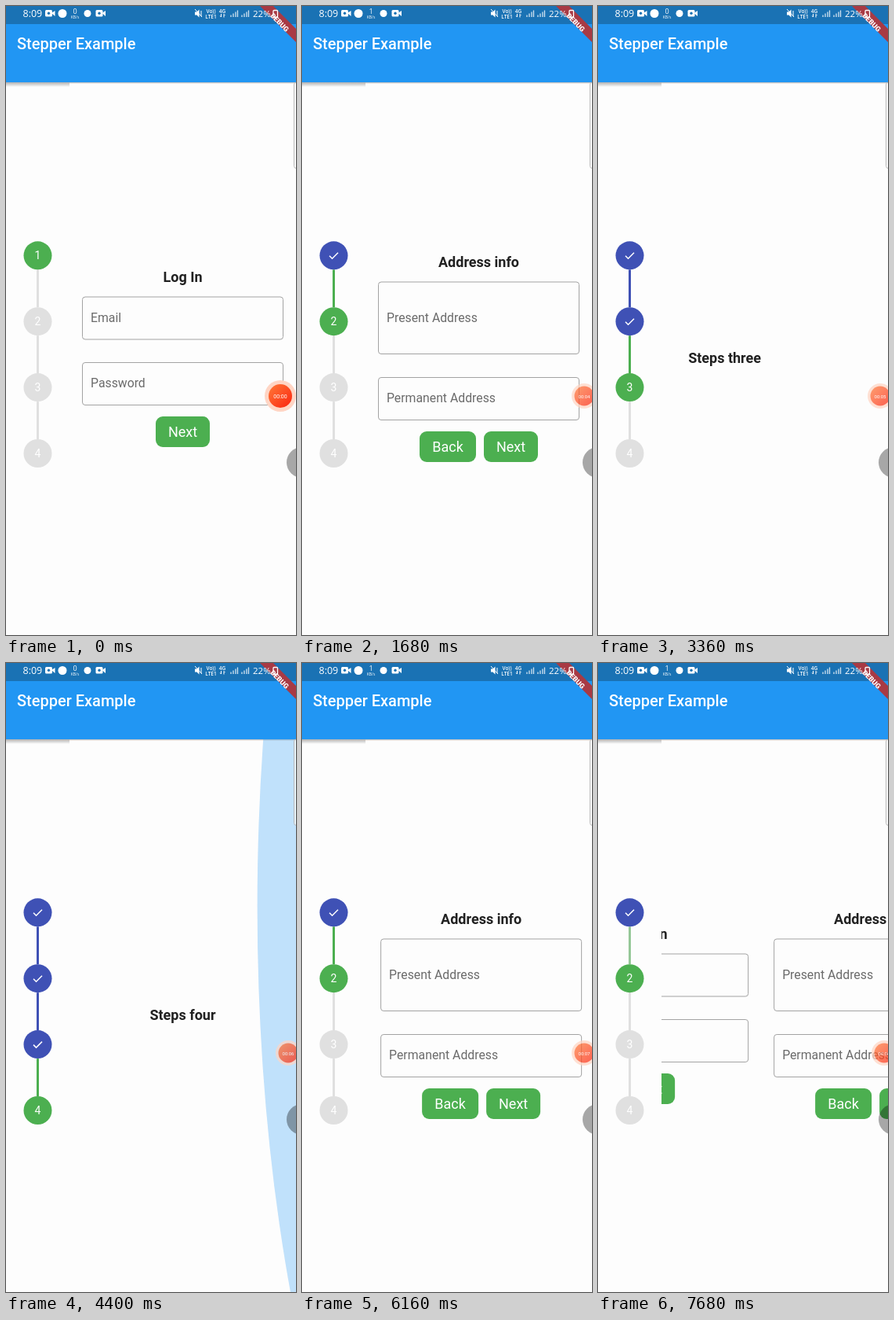
These frames come from a looping animation (370 px wide and 800 px high, 7760 ms). An HTML page:

```html
<!DOCTYPE html>
<html lang="en">
<head>
<meta charset="utf-8">
<title>Stepper Example</title>
<style>
html, body { margin: 0; width: 100%; height: 100%; overflow: hidden; background: #fdfdfd; }
svg { display: block; width: 370px; height: 800px; font-family: Roboto, "Open Sans", sans-serif; }
.mid { text-anchor: middle; }
.head { font-size: 18px; font-weight: 700; fill: #212121; }
.label { font-size: 15.8px; fill: #6b6b6b; }
.button { font-size: 18px; fill: #fff; }
.step { font-size: 14px; fill: #fff; }
.status { font-family: "Open Sans", sans-serif; fill: #fff; }
</style>
</head>
<body>
<svg viewBox="0 0 370 800">
  <defs>
    <clipPath id="view"><rect x="81" y="97" width="289" height="703"/></clipPath>
    <linearGradient id="shade" x2="0" y2="1">
      <stop stop-color="#000" stop-opacity=".3"/><stop offset="1" stop-color="#000" stop-opacity="0"/>
    </linearGradient>
    <linearGradient id="hot" x2="1" y2="1">
      <stop stop-color="#ff7a38"/><stop offset="1" stop-color="#fb2410"/>
    </linearGradient>
  </defs>
  <rect width="370" height="800" fill="#fdfdfd"/>
  <rect y="97" width="81" height="6" fill="url(#shade)"/>
  <rect x="81" y="97" width="289" height="2" fill="url(#shade)"/>
  <g id="stepper"></g>
  <g clip-path="url(#view)">
    <g id="pages"></g>
    <ellipse id="glowRight" ry="1054" cy="310" fill="#2196f3"/>
    <ellipse id="glowLeft" ry="1054" cy="310" fill="#2196f3"/>
  </g>
  <rect y="23" width="370" height="74" fill="#2196f3"/>
  <rect width="370" height="23" fill="#1a72b4"/>
  <text x="14" y="55" font-size="20" font-weight="500" fill="#fff">Stepper Example</text>

  <path d="M324 0H341L370 29V46Z" fill="#a83a44"/>
  <text class="mid" transform="translate(349 21) rotate(45)" y="3" font-size="9" font-weight="900" fill="#fff">DEBUG</text>

  <g class="status">
    <text x="21.5" y="14" font-size="12.5">8:09</text>
    <g id="camera" fill="#fff">
      <rect x="50" y="5" width="9" height="8.5" rx="1.5"/><path d="M58 9l4.500-3v7z"/>
      <circle cx="54.500" cy="9.200" r="1.700" fill="#1a72b4"/>
    </g>
    <use href="#camera" x="64.500"/>
    <circle cx="72" cy="9.500" r="5.500" fill="#fff"/>
    <circle cx="104" cy="9.500" r="4.500" fill="#fff"/>
    <text id="rate" class="mid" x="88" y="9.500" font-size="9"></text>
    <text class="mid" x="88" y="15.500" font-size="5">KB/s</text>
    <path d="M241 7.500h2.500l3-3v10l-3-3h-2.500z" fill="#fff"/>
    <path d="M241 4l9 10M249 6v7" stroke="#fff" fill="none"/>
    <g class="mid" font-weight="600">
      <text x="261.500" y="8.500" font-size="6.500">Vo))</text>
      <text x="261.500" y="15.500" font-size="6.500">LTE1</text>
      <text x="276" y="9" font-size="6.500">4G</text>
    </g>
    <path d="M274.500 10v4m-1.500-1.500l1.500 1.500M278 14.500v-4m1.500 1.500l-1.500-1.500" stroke="#fff" fill="none"/>
    <path id="bars" d="M287 14v-2.500M290 14v-4.500M293 14v-6.500M295.500 14v-8.500" stroke="#fff" stroke-width="1.300" opacity=".8"/>
    <use href="#bars" x="14"/>
    <text x="315" y="13.500" font-size="11.500">22%</text>
    <rect x="341" y="5.500" width="5.500" height="9" rx="1" fill="none" stroke="#fff" stroke-width="1.300"/>
  </g>

  <rect x="367.500" y="97" width="8" height="109.500" rx="3" fill="#fff" fill-opacity=".6" stroke="#b8b8b8"/>
  <g id="recorder">
    <circle id="ring" fill="#ffd5c4"/>
    <circle id="core" fill="url(#hot)"/>
    <text id="timer" class="mid" y="2.500" font-size="7" fill="#fff"></text>
  </g>
  <circle cx="377.500" cy="580.500" r="19.500" fill-opacity=".34"/>
</svg>
<script>
const $ = id => document.getElementById(id);
const set = (el, attrs) => { for (const k in attrs) el.setAttribute(k, attrs[k]); };
const clamp = v => Math.min(1, Math.max(0, v));

const LOOP = 7760, TICK = 80, PAGE = 289;
const GREY = [224, 224, 224], GREEN = [76, 175, 80], BLUE = [63, 81, 181];

// Page contents, laid out at their resting place.
const head = (y, s) => `<text class="mid head" x="225.5" y="${y}">${s}</text>`;
const field = (y, h, base, s) =>
  `<rect x="97.5" y="${y}" width="256" height="${h}" rx="3.5" fill="none" stroke="#a3a3a3"/>
   <text class="label" x="108" y="${base}">${s}</text>`;
const button = (x, y, w, s) =>
  `<rect x="${x}" y="${y}" width="${w}" height="39" rx="9" fill="#4caf50"/>
   <text class="mid button" x="${x + w / 2}" y="${y + 26}">${s}</text>`;

$('pages').innerHTML = [
  head(351, 'Log In') + field(370, 54, 401.5, 'Email') + field(453.5, 54, 485, 'Password') +
    button(191, 522, 69, 'Next'),
  head(331.5, 'Address info') + field(351, 91.5, 401.5, 'Present Address') +
    field(472.5, 54, 504, 'Permanent Address') + button(150, 541, 72, 'Back') + button(232, 541, 69, 'Next'),
  head(453.5, 'Steps three'),
  head(453.5, 'Steps four')
].map(s => `<g>${s}</g>`).join('');

const stepY = i => 317.3 + 83.9 * i;
$('stepper').innerHTML =
  [0, 1, 2].map(i => `<path class="line" d="M40.500 ${stepY(i) + 18}v48" stroke-width="3"/>`).join('') +
  [0, 1, 2, 3].map(i => `<g transform="translate(40.500 ${stepY(i)})"><circle class="dot" r="18"/>
    <text class="mid step" y="5">${i + 1}</text>
    <path class="tick" d="M-5.500 .5l3.500 3.500l7.500-7.500" fill="none" stroke="#fff" stroke-width="1.500"/></g>`).join('');

const all = s => [...document.querySelectorAll(s)];
const pages = [...$('pages').children];
const lines = all('.line'), dots = all('.dot'), numbers = all('.step'), ticks = all('.tick');

// Each swipe: start time and direction.
const swipes = [[960, 1], [2234, 1], [3294, 1], [4800, -1], [5400, -1], [6157, -1], [7485, 1]];
const position = t => swipes.reduce((p, [start, dir]) =>
  p + dir * (1 - (1 - clamp((t - start) / 720)) ** 2.6), 0);
const active = t => Math.round(position(t));

const rgb = c => `rgb(${c.map(Math.round)})`;
const shade = (i, now) => i < now ? BLUE : i === now ? GREEN : GREY;

function glow(el, t, start, right) {
  const amount = clamp((t - start) / 200) * (1 - clamp((t - start - 280) / 400));
  const scale = 0.35 * amount, shift = (1054 - 141) * scale;
  set(el, { cx: right ? 370 + shift : 81 - shift, rx: 1054 * scale, opacity: 0.28 * Math.sqrt(amount) });
}

function draw(t) {
  const pos = position(t), now = active(t), before = active(Math.max(0, t - TICK));
  pages.forEach((p, i) => set(p, { transform: `translate(${(i - pos) * PAGE} 0)` }));
  dots.forEach((d, i) => {
    set(d, { fill: rgb(shade(i, now)) });
    set(numbers[i], { opacity: i < now ? 0 : 1 });
    set(ticks[i], { opacity: i < now ? 1 : 0 });
  });
  lines.forEach((l, i) => {
    const old = shade(i + 1, before);
    set(l, { stroke: rgb(shade(i + 1, now).map((v, k) => (v + old[k]) / 2)) });
  });
  glow($('glowRight'), t, 4200, true);
  glow($('glowLeft'), t, 6520, false);

  const tuck = clamp((t - 400) / 320), leave = clamp((t - 7440) / 240);
  set($('recorder'), { transform: `translate(${350 + 10 * tuck + 5 * leave} 496)`, opacity: 1 - 0.28 * tuck });
  set($('ring'), { r: 20 - 4 * tuck });
  set($('core'), { r: 15 - 2.5 * tuck });
  set($('timer'), { 'font-size': 7 - tuck });
  $('timer').textContent = '00:0' + (t < 600 ? 0 : Math.floor(3.6 + t * 0.0007));
  $('rate').textContent = t < 800 || (t >= 2480 && t < 5000) ? 0 : 1;
}

const begin = performance.now();
function frame() {
  const t = (performance.now() - begin) % LOOP;
  draw(Math.floor(t / TICK) * TICK);
  requestAnimationFrame(frame);
}
frame();
</script>
</body>
</html>
```
